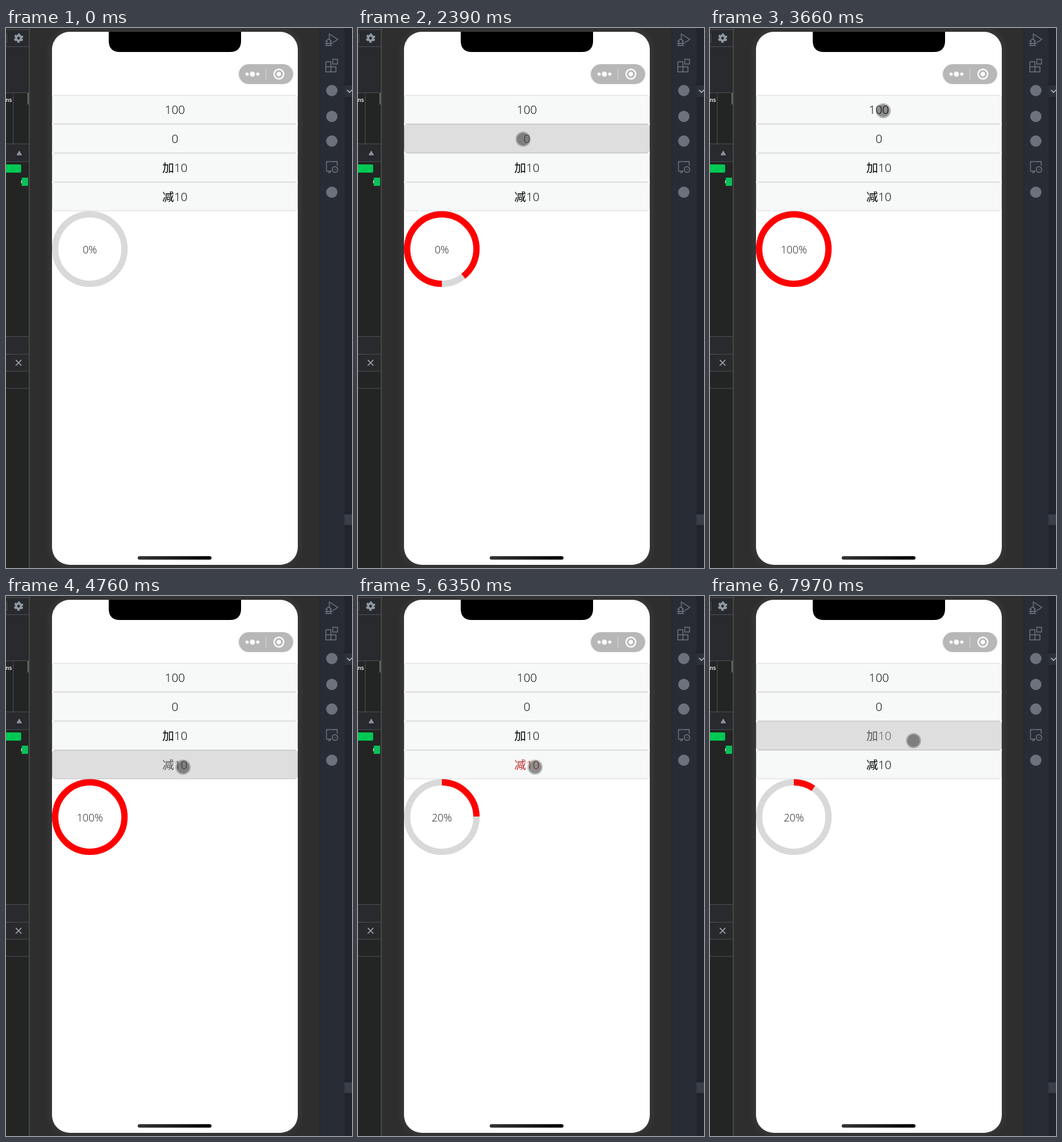
Animation, 549 px wide and 855 px high, one loop 8000 ms. Source, as an HTML page:

```html
<!DOCTYPE html>
<html lang="zh">
<head>
<meta charset="utf-8">
<title>Progress ring</title>
<style>
  html, body { margin: 0; width: 100%; height: 100%; overflow: hidden; background: #2e2e2e; }
  svg { display: block; width: 549px; height: 855px; }
  text { font-family: "Open Sans", "Noto Sans CJK SC", "Noto Sans CJK", sans-serif; font-weight: 350; text-anchor: middle; }
  .button rect { fill: #f7f8f8; stroke: #dedede; }
  .button text { font-size: 18.7px; }
  .button.released text { fill: #c03030; }
  .button.pressed rect { fill: #dedede; stroke: #c5c5c5; }
  .button.pressed text { fill: #595959; }
  .ring { fill: none; stroke-width: 10; }
  .icon { fill: none; stroke: #6c727c; stroke-width: 1.4; }
  .mark { fill: #6c727c; }
</style>
</head>
<body>
<svg viewBox="0 0 549 855">
  <defs>
    <filter id="glow" x="-20%" y="-10%" width="140%" height="120%"><feGaussianBlur stdDeviation="7"/></filter>
    <linearGradient id="bar"><stop stop-color="#333"/><stop offset="1"/></linearGradient>
  </defs>
  <rect width="549" height="855" fill="#2e2e2e"/>

  <!-- left panel -->
  <rect width="37" height="855" fill="#232524"/>
  <path fill="#292a2d" d="M0 0H36V102H0ZM0 184H36V211H0ZM0 489H36V543H0Z"/>
  <path fill="none" stroke="#494c50" d="M0 2.5H36M0 29.5H36M0 102.5H36M0 183.5H36M0 211.5H36M0 488.5H36M0 516.5H36M0 543.5H36M0 570.5H36M1.5 8V24M11.5 103V183"/>
  <path stroke="#454545" stroke-width="2" d="M37 0V855"/>
  <path fill="#66686b" d="M34 103H36V121H34Z"/>
  <g fill="none" stroke="#909aa5" transform="translate(20 16) rotate(15)">
    <circle r="4" stroke-width="3.6"/>
    <circle r="6.3" stroke-width="2.4" stroke-dasharray="3.3 3.3"/>
  </g>
  <text x="3" y="117" font-size="9" style="font-weight:600" fill="#fff">ms</text>
  <path fill="#8d969f" d="M16.5 201.5 21 194 25.5 201.5Z"/>
  <rect x="-3" y="216" width="27" height="13" rx="2" fill="#00c853"/>
  <path fill="#0abf59" d="M25 237H35V250H25Z"/>
  <path fill="#ddd" d="M24 241H25V246H24Z"/>
  <path stroke="#9aa0a6" stroke-width="1.7" d="M15.5 525.5 24.5 534.5M24.5 525.5 15.5 534.5"/>

  <!-- right bars -->
  <path fill="#282c34" d="M498 0H537V855H498Z"/>
  <path fill="#21252b" d="M537 0H549V855H537Z"/>
  <path stroke="#25282e" stroke-width="2" d="M498 0V855"/>
  <path fill="#2c313a" d="M537 91H549V109H537Z"/>
  <path fill="#393e48" d="M537 770H549V787H537Z"/>
  <path fill="none" stroke="#c5c9d0" stroke-width="1.3" d="M541 98 545 102 549 98"/>
  <g class="icon">
    <path d="M513 18V9.5L526.500 18 516 25M509 21a3 3 0 0 1 6 0v4a3 3 0 0 1-6 0ZM507 20l2 2M517 20l-2 2M506 24.500H518M507 29l2-2M517 29l-2-2"/>
    <path d="M507.500 53.500H515.500V69.500H507.500ZM507.500 61.500H523.500V69.500H515.500M518.500 49.500H526V57H518.500Z"/>
    <path d="M516 226.500H508.500V211.500H525.500V218M511 228.500H516"/>
    <circle cx="522" cy="224" r="4.500"/>
    <path d="M519.500 225l2-2M522.500 225l2-2" stroke-width="1"/>
  </g>
  <g class="mark">
    <circle cx="517" cy="99" r="9"/><circle cx="517" cy="140" r="9"/>
    <circle cx="517" cy="179" r="9"/><circle cx="517" cy="260" r="9"/>
  </g>

  <!-- phone -->
  <rect x="73" y="6" width="390" height="844" rx="28" fill="#555" opacity=".5" filter="url(#glow)"/>
  <rect x="73" y="6" width="390" height="844" rx="28" fill="#fff"/>
  <path d="M163 6H373V20Q373 38 355 38H181Q163 38 163 20Z"/>
  <rect x="369.5" y="57.5" width="86" height="31" rx="15.5" fill="#b7b7b7" stroke="#c6c6c6"/>
  <g fill="#fff">
    <circle cx="382.5" cy="73" r="2.5"/><circle cx="391" cy="73" r="4"/><circle cx="399.5" cy="73" r="2.5"/>
    <circle cx="433" cy="73" r="3.6"/>
    <circle cx="433" cy="73" r="7.6" fill="none" stroke="#fff" stroke-width="2.2"/>
  </g>
  <path stroke="#d2d2d2" d="M412.5 65V82"/>
  <rect x="209" y="836.3" width="117" height="5.4" rx="2.700" fill="url(#bar)"/>

  <g id="buttons"></g>
  <circle class="ring" cx="133" cy="350" r="55" stroke="#d9d9d9"/>
  <path class="ring" id="right" pathLength="180" stroke="#f00" d="M133 295A55 55 0 0 1 133 405"/>
  <path class="ring" id="left" pathLength="180" stroke="#f00" d="M133 405A55 55 0 0 1 133 295"/>
  <text id="percent" x="133" y="357" font-size="16.5" fill="#222"></text>

  <g id="touch">
    <circle r="12" opacity=".23"/>
    <circle r="10" opacity=".26"/>
  </g>
  <path id="arrow" fill="#fff" stroke="#000" d="M.5.5V16L4 12.700 6.500 18.300 8.700 17.300 6.300 11.800H11.300Z"/>
</svg>
<script>
const LOOP = 8000, DURATION = 300, TAP_GAP = 212;
const $ = id => document.getElementById(id);

const actions = [
  { label: '100', apply: () => 100 },
  { label: '0', apply: () => 0 },
  { label: '加10', apply: value => value + 10 },
  { label: '减10', apply: value => value - 10 }
];

$('buttons').innerHTML = actions.map(({ label }, i) =>
  `<g class="button" transform="translate(73 ${106 + 46 * i})">
    <rect x=".5" y=".5" width="389" height="45" rx="4.5"/><text x="195" y="30">${label}</text></g>`).join('');
const buttons = [...document.querySelectorAll('.button')];

const taps = [];
function tap(button, start, count = 1) {
  for (let i = 0; i < count; i++) taps.push({ button, time: start + i * TAP_GAP });
}
tap(0, 1120);
tap(1, 2342);
tap(0, 3185);
tap(3, 4771, 11);
tap(2, 7541, 3);

// Pointer moves: start, end and the point reached
const moves = [
  [120, 120, 518, 789], [190, 190, 484, 684], [340, 980, 271, 135], [1650, 2220, 262, 176],
  [2660, 3020, 275, 131], [3660, 4360, 289, 287], [4460, 4620, 281, 271], [7120, 7430, 323, 229]
];

// CSS "ease": cubic-bezier(.25, .1, .25, 1)
function ease(x) {
  if (x >= 1) return 1;
  const bezier = (a, b, s) => 3 * a * s * (1 - s) ** 2 + 3 * b * s * s * (1 - s) + s ** 3;
  let low = 0, high = 1;
  for (let i = 0; i < 20; i++) {
    const mid = (low + high) / 2;
    if (bezier(.25, .25, mid) < x) low = mid; else high = mid;
  }
  return bezier(.1, 1, low);
}

const mix = (a, b, k) => a + (b - a) * k;

class Transition {
  from = 0; to = 0; start = -DURATION;
  at(t) { return mix(this.from, this.to, ease((t - this.start) / DURATION)); }
  set(to, t) {
    if (to === this.to) return;
    this.from = this.at(t);
    this.to = to;
    this.start = t;
  }
}

// A negative angle shows the far end of the half ring.
const dashes = angle => angle >= 0 ? `${angle} 400` : `0 ${180 + angle} ${-angle} 0`;

function drawRing(t) {
  const right = new Transition(), left = new Transition();
  let percent = 0;
  for (const { button, time } of taps) {
    if (time > t) break;
    percent = actions[button].apply(percent);
    right.set(Math.min(percent, 50) * 3.6, time);
    if (percent >= 50) left.set((percent - 50) * 3.6, time);
  }
  $('right').setAttribute('stroke-dasharray', dashes(right.at(t)));
  $('left').setAttribute('stroke-dasharray', dashes(left.at(t)));
  $('percent').textContent = percent + '%';
}

function drawPointer(t) {
  let x = -50, y = -50;
  for (const [start, end, toX, toY] of moves) {
    if (t < start) break;
    const k = t >= end ? 1 : (t - start) / (end - start), smooth = k * k * (3 - 2 * k);
    x = mix(x, toX, smooth);
    y = mix(y, toY, smooth);
  }
  const inside = x < 463;
  $('touch').setAttribute('visibility', inside ? 'visible' : 'hidden');
  $('arrow').setAttribute('visibility', inside ? 'hidden' : 'visible');
  $(inside ? 'touch' : 'arrow').setAttribute('transform', `translate(${x} ${y})`);
}

function drawButtons(t) {
  buttons.forEach((element, i) => {
    const tappedWithin = (from, to) =>
      taps.some(({ button, time }) => button === i && t > time + from && t < time + to);
    element.classList.toggle('pressed', tappedWithin(-60, 85));
    element.classList.toggle('released', tappedWithin(85, 300));
  });
}

const began = performance.now();
function tick() {
  const t = (performance.now() - began) % LOOP;
  drawButtons(t);
  drawRing(t);
  drawPointer(t);
  requestAnimationFrame(tick);
}
tick();
</script>
</body>
</html>
```
